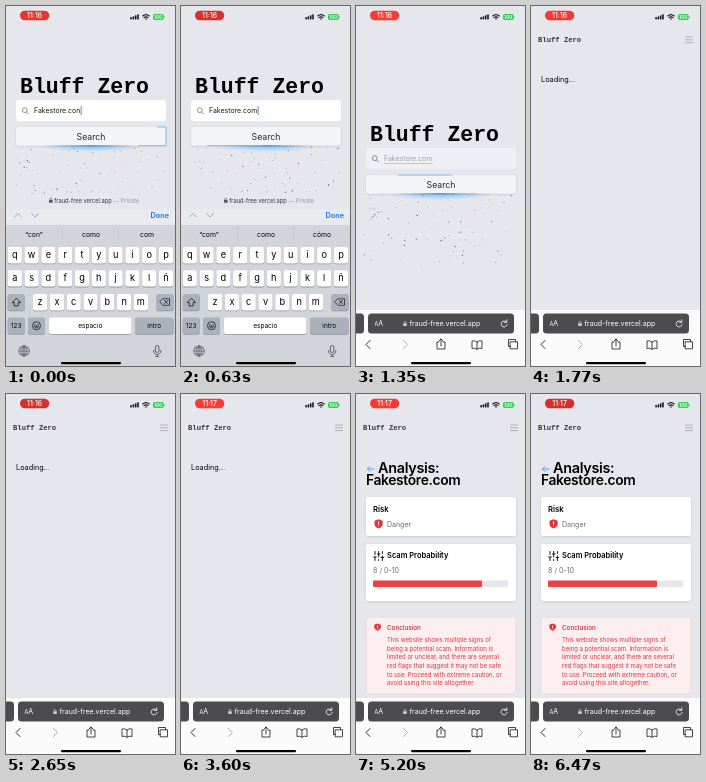
These frames come from a looping animation (169x360 px, 6490 ms). An HTML page:

```html
<!DOCTYPE html>
<html lang="en">
<head>
<meta charset="utf-8">
<style>
html, body { margin: 0; width: 100%; height: 100%; overflow: hidden; background: #e5e7ec; }
svg { display: block; width: 100vw; height: 100vh; font-family: Inter, "Liberation Sans", sans-serif; }
.mono { font-family: "Liberation Mono", monospace; font-weight: 700; }
.line { fill: none; stroke-linecap: round; stroke-linejoin: round; }
</style>
</head>
<body>
<svg id="stage" viewBox="0 0 169 360"></svg>
<script>
const LOOP = 6490, BRAND = "Bluff Zero", SITE = "fraud-free.vercel.app";
const INK = "#16181d", BLUE = "#1677ee", RED = "#e03438", PAGE = "#e5e7ec";

const text = (x, y, size, s, attrs = "") => `<text x="${x}" y="${y}" font-size="${size}" ${attrs}>${s}</text>`;
const rect = (x, y, w, h, fill, r = 0, attrs = "") =>
  `<rect x="${x}" y="${y}" width="${w}" height="${h}" rx="${r}" fill="${fill}" ${attrs}/>`;
const line = (d, color = INK, w = 0.9) => `<path class="line" d="${d}" stroke="${color}" stroke-width="${w}"/>`;
const group = (id, body) => `<g id="${id}">${body}</g>`;
const mid = 'text-anchor="middle"';
const lock = (x, y, color) => rect(x, y, 3.6, 2.8, color, 0.5) +
  line(`M${x + 0.8} ${y}v-.9a1 1 0 0 1 2 0v.9`, color, 0.6);
const shield = (x, y, s) => `<g transform="translate(${x} ${y}) scale(${s})">
  <path d="M4 0L8 1.4V4.5Q7.8 7.5 4 9Q.2 7.5 0 4.5V1.4Z" fill="${RED}"/>${line("M4 2.4v2.3M4 6.3v.1", "#fff", 1)}</g>`;
const card = (y, h) => rect(10, y, 150, h, "#fff", 3, 'filter="url(#soft)"');

// Seeded dots below the button
let seed = 7;
const rnd = () => (seed = (seed * 16807) % 2147483647) / 2147483647;
const dots = Array.from({ length: 120 }, () => ({
  x: 10 + rnd() * 149, y: 142 + 68 * rnd() ** 1.25, vx: (rnd() - 0.5) * 6, vy: (rnd() - 0.5) * 6,
  r: 0.3 + rnd() * 0.35, rate: 2 + rnd() * 5, phase: rnd() * 6.3
}));

const home = group("home",
  text(14, 87, 21.5, BRAND, 'class="mono"') +
  rect(10, 94, 150, 21, "#fff", 3, 'id="field"') +
  '<circle cx="18.8" cy="104.2" r="2.4" fill="none" stroke="#777" stroke-width=".8"/>' + line("M20.6 106l1.9 2", "#777", 0.8) +
  text(28, 107.4, 6.95, "", 'id="query"') + rect(0, 100, 0.8, 9, "#247ba0", 0, 'id="caret"') +
  group("spell", line("M28 109.6H76", "#d98b90", 0.6)) +
  group("dots", dots.map(d => `<circle r="${d.r}" fill="#454952"/>`).join("")) +
  '<ellipse cx="85" cy="140" rx="52" ry="6" fill="url(#halo)"/>' +
  rect(10, 121, 150, 18.6, "#f3f4f6", 3, 'filter="url(#soft)"') +
  text(85, 133.6, 8.7, "Search", mid + ' fill="#24272d"') +
  rect(38, 139.2, 94, 1.2, "url(#beam)") +
  '<path id="spark" class="line" d="M10 121H160V139.600H10Z" pathLength="100" stroke="#63c3f5" stroke-width=".9" stroke-dasharray="16 84"/>');

const header = text(7, 36.3, 7.2, BRAND, 'class="mono" fill="#30343b"') +
  line("M154.5 31h7M154.5 33.8h7M154.5 36.6h7", "#9599a0", 0.7);

const conclusion = ["This website shows multiple signs of", "being a potential scam. Information is",
  "limited or unclear, and there are several", "red flags that suggest it may not be safe",
  "to use. Proceed with extreme caution, or", "avoid using this site altogether."];

const result = group("result",
  line("M18 75h-6.5m2.5-2.5l-2.5 2.5l2.5 2.5", "#5aa2f5", 1) +
  text(22, 79.3, 14.4, "Analysis:", 'font-weight="600" letter-spacing="-.3"') +
  text(10, 91.3, 13.8, "Fakestore.com", 'font-weight="600" letter-spacing="-.34"') +
  card(103, 39) + text(17, 118, 7.7, "Risk", 'font-weight="600"') +
  shield(18.5, 125.3, 1.02) + text(31, 132.8, 7, "Danger", 'fill="#666b75"') +
  card(150, 57) +
  line("M19 157.5v3m0 2.5v3.5M22.7 157.5v5.5m0 2.5v1M26.4 157.5v2m0 2.5v4.5M17.7 163h2.6M21.4 160h2.6M25.1 163.5h2.6", INK, 1) +
  text(31, 164.3, 7.5, "Scam Probability", 'font-weight="600"') +
  text(17, 179, 7.1, "8 / 0-10", 'fill="#666b75"') +
  rect(17, 186.5, 135, 6.5, "#e5e7eb", 1) + rect(17, 186.5, 109, 6.5, "#ed4245", 1) +
  rect(10.3, 223.3, 149.4, 76.4, "#fdeff0", 3, 'stroke="#f8cdd0" stroke-width=".6"') +
  shield(18.3, 229.6, 0.82) + text(31, 235.6, 6.3, "Conclusion", 'font-weight="500" fill="#c52c34"') +
  conclusion.map((s, i) => text(31, 248.3 + i * 8.55, 6, s, 'fill="#d7373f"')).join(""));

const mini = group("mini", rect(0, 188, 169, 15, PAGE) + lock(43, 194, "#555") +
  text(48.2, 197, 5.7, `${SITE} <tspan fill="#999da5">— Private</tspan>`, 'fill="#33363b"'));

const chrome = group("chrome", rect(0, 304, 169, 220, PAGE) + rect(0, 304, 169, 220, "#fbfbfc", 0, 'id="sheet"') +
  group("address", rect(-10, 307.5, 18, 20, "#4c4c4f", 3.5) + rect(12, 307.5, 146, 20, "#4c4c4f", 3.5) +
    text(18.5, 320.2, 5.5, "A", 'fill="#fff"') + text(22.2, 320.2, 7, "A", 'fill="#fff"') + lock(47.2, 317.2, "#ccc") +
    text(53.5, 320.3, 7, SITE, 'fill="#fff"') +
    line("M150.6 316.2a3 3 0 1 0 .5 2.3M150.8 313.8v2.5h-2.5", "#fff", 0.8)) +
  line("M14 334.5l-4 4l4 4") + line("M47.5 334.5l4 4l-4 4", "#a5a7ab") +
  line("M83 336h-2v7h8v-7h-2M85 340v-7m-2 2l2-2l2 2", INK, 0.8) +
  line("M121 336q-2.5-2-5-1v7.5q2.5-1 5 .8q2.5-1.8 5-.8V335q-2.5-1-5 1v7", INK, 0.8) +
  line("M154.5 335.8h7v7h-7zM154.5 340.5h-2v-7h7v2", INK, 0.8));

const key = (x, y, w, label, dark, size = 9.2) =>
  rect(x, y + 0.8, w, 16.4, "#93969d", 2) + rect(x, y, w, 16.4, dark ? "#abb0ba" : "#fdfdfe", 2) +
  text(x + w / 2, y + (size > 7 ? 11 : 10.4), size, label, mid);
const row = (letters, x, y) => [...letters].map((c, i) => key(x + i * 16.8, y, 14.2, c)).join("");

const keyboard = group("keyboard", rect(0, 203, 169, 157, "#d1d4db") + rect(0, 203, 169, 16, "#e8eaee") +
  line("M8.5 211l3.5-3.5l3.5 3.5M25.5 207.5l3.5 3.5l3.5-3.5", "#8ab0d8", 1) +
  text(163, 211.6, 7.3, "Done", `text-anchor="end" font-weight="600" fill="${BLUE}"`) +
  [28, 85, 141].map(x => text(x, 231.2, 6.8, "", mid + ' class="hint"')).join("") +
  line("M56.5 223v11M112.5 223v11", "#b4b8c0", 0.5) +
  row("qwertyuiop", 1.7, 241) + row("asdfghjklñ", 1.7, 264.2) +
  key(1.7, 288, 17, "", true) + row("zxcvbnm", 27, 288) + key(150.5, 288, 17, "", true) +
  line("M10.2 292.5l-4 4h2v3.5h4v-3.5h2z", INK, 0.8) +
  line("M157 292.8h6.5v6.5h-6.5l-3-3.25zM158.5 294.5l3 3m0-3l-3 3", INK, 0.7) +
  key(1.7, 311.5, 17, "123", true, 6.4) + key(22, 311.5, 17, "", true) +
  key(43, 311.5, 82.5, "espacio", false, 6.5) + key(129, 311.5, 38.5, "intro", true, 6.5) +
  `<circle cx="30.5" cy="319.7" r="4" fill="none" stroke="${INK}" stroke-width=".8"/>` +
  line("M29 318.3v.4M32 318.3v.4M28.3 320.5q2.2 3 4.4 0z", INK, 0.8) +
  line("M12.8 345a5.200 5.200 0 1 0 10.400 0a5.200 5.200 0 1 0-10.400 0h10.400M18 339.8q-5 5.200 0 10.400q5-5.200 0-10.400v10.400M13.8 342h8.400M13.8 348h8.400", "#4c5058", 0.7) +
  rect(149.4, 339.5, 3.6, 7, "none", 1.8, 'stroke="#4c5058" stroke-width=".9"') +
  line("M147.5 344.5q0 4 3.7 4t3.7-4M151.2 348.5v2M149.7 350.5h3", "#4c5058", 0.8));

const status = rect(14, 4.7, 29.3, 9.6, "", 4.8, 'id="pill"') +
  text(28.6, 11.9, 6.9, "", mid + ' id="clock" fill="#fff" font-weight="500"') +
  [2.4, 3.2, 4.2, 5.2].map((h, i) => rect(124.3 + i * 2.3, 13.5 - h, 1.6, h, INK, 0.4)).join("") +
  line("M136.7 10q3.3-2.8 6.6 0M138 11.6q2-1.5 4 0", INK, 1.1) + `<circle cx="140" cy="13" r=".8" fill="${INK}"/>` +
  rect(147, 8, 10.7, 6, "#37cf5a", 1.7) + rect(158.2, 10, 0.8, 2, "#37cf5a", 0.4) +
  text(152.3, 12.7, 4.6, "100", mid + ' fill="#fff" font-weight="600"');

const $ = id => document.getElementById(id);
$("stage").innerHTML = `<defs>
  <filter id="soft" x="-5%" y="-20%" width="110%" height="150%"><feDropShadow dx="0" dy=".8" stdDeviation=".9" flood-opacity=".13"/></filter>
  <radialGradient id="halo"><stop stop-color="#4aa3ef" stop-opacity=".55"/><stop offset="1" stop-color="#4aa3ef" stop-opacity="0"/></radialGradient>
  <linearGradient id="beam"><stop stop-color="#6699f2" stop-opacity="0"/><stop offset=".5" stop-color="#2890ed"/><stop offset="1" stop-color="#6699f2" stop-opacity="0"/></linearGradient>
  </defs>` + rect(0, 0, 169, 360, PAGE) + home +
  group("inner", header + text(10, 75.8, 7.3, "Loading...", 'id="loading"') + result) +
  mini + chrome + keyboard + status + rect(55, 356, 60, 2.3, "#000", 1.1);

const show = (id, on) => $(id).style.display = on ? "" : "none";
const shift = (id, y) => $(id).setAttribute("transform", `translate(0 ${y})`);
const fade = (id, a) => $(id).style.opacity = a;
const circles = [...$("dots").children], hints = document.querySelectorAll(".hint");

function draw(ms) {
  const t = ms % LOOP, s = t / 1000;
  const u = Math.min(1, Math.max(0, (t - 1028) / 330)), p = 1 - (1 - u) ** 3;
  const atHome = t < 1500, done = t >= 4300;
  show("home", atHome);
  show("inner", !atHome);
  show("loading", !done);
  show("result", done);
  show("mini", u === 0);
  show("keyboard", u < 1);
  $("clock").textContent = t < 2800 ? "11:16" : "11:17";
  // The recording pill breathes between dark and bright red
  const glow = 0.5 + 0.5 * Math.cos((s - 1.45) * Math.PI);
  $("pill").setAttribute("fill", `rgb(${212 + 42 * glow} ${47 + 12 * glow} ${44 + 8 * glow})`);

  shift("home", Math.min(48, 68 * p));
  shift("keyboard", 157 * p);
  shift("chrome", 144 * (p - 1));
  fade("chrome", Math.min(1, p * 1.4));
  fade("sheet", p ** 4);
  fade("address", p ** 3);

  if (!atHome) return;
  const end = t < 140 ? "con" : t < 350 ? "co" : "com";
  const words = { con: ["“con”", "como", "com"], co: ["“co”", "como", "con"], com: ["“com”", "como", "cómo"] }[end];
  hints.forEach((h, i) => h.textContent = words[i]);
  const query = $("query");
  query.textContent = "Fakestore." + end;
  query.setAttribute("fill", u ? "#a3a0a5" : INK);
  fade("field", u ? 0.35 : 1);
  $("caret").setAttribute("x", 28.4 + query.getComputedTextLength());
  show("caret", u === 0);
  show("spell", u > 0);
  $("spark").setAttribute("stroke-dashoffset", -42 - 50 * s);
  dots.forEach((d, i) => {
    circles[i].setAttribute("cx", d.x + d.vx * s);
    circles[i].setAttribute("cy", d.y + d.vy * s);
    circles[i].setAttribute("opacity", 0.5 + 0.45 * Math.sin(d.phase + d.rate * s));
  });
}

const start = performance.now();
function tick() {
  draw(performance.now() - start);
  requestAnimationFrame(tick);
}
tick();
</script>
</body>
</html>
```
